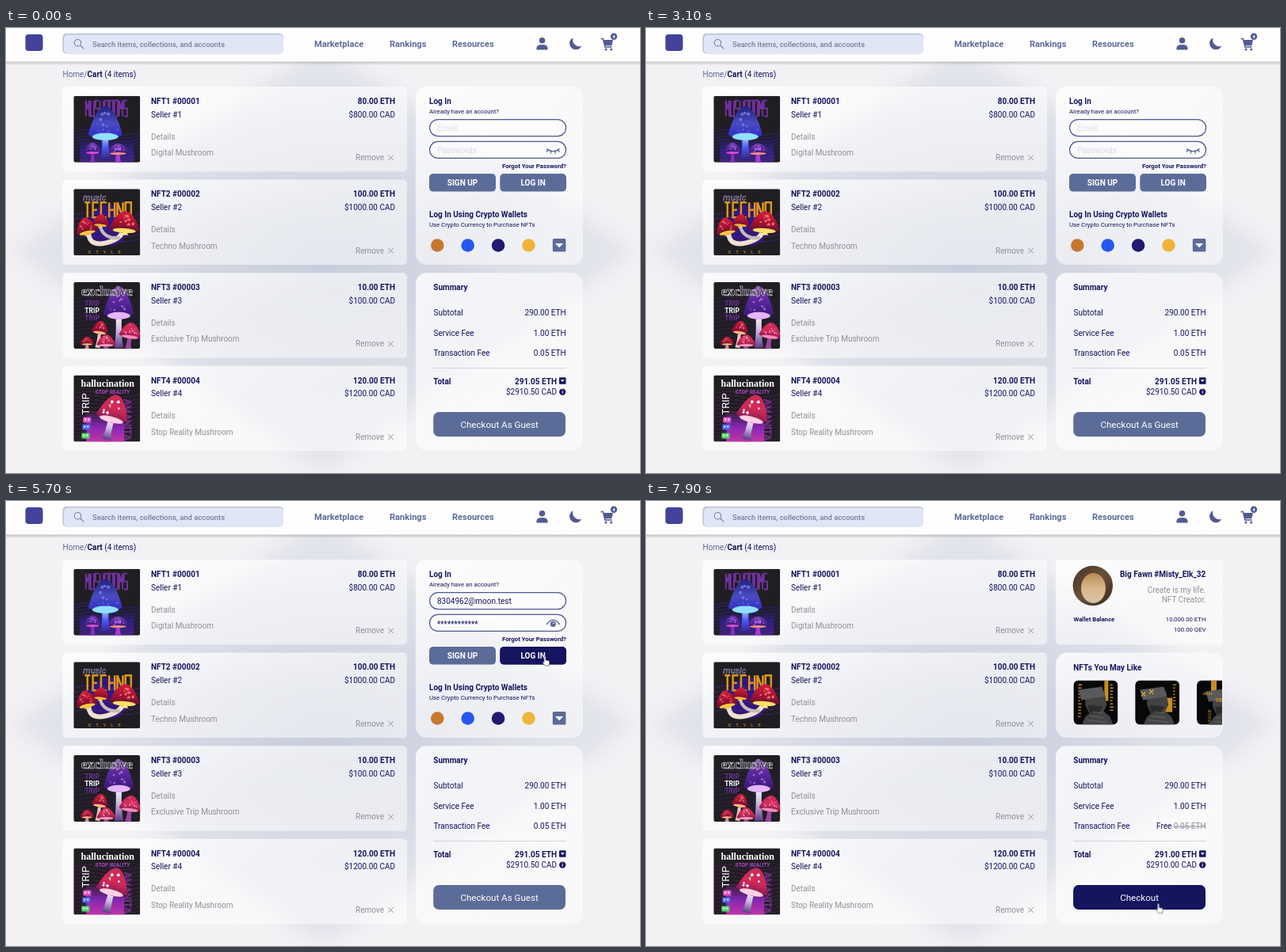
An HTML page for the animation above (8000 ms loop, 800 by 562 pixels).

```html
<!DOCTYPE html>
<html lang="en">
<head>
<meta charset="utf-8">
<title>Cart</title>
<style>
  html, body { margin: 0; width: 100%; height: 100%; overflow: hidden; background: #f2f1f4; }
  svg { display: block; }
  text { font-family: Roboto, sans-serif; white-space: pre; }
  .pointer { animation: move 8s linear infinite; }
  @keyframes move {
    0%, 41.25% { transform: translate(688px, 158px); animation-timing-function: ease-out; }
    45%, 58.75% { transform: translate(600px, 123.5px); animation-timing-function: ease-in-out; }
    61.25%, 65% { transform: translate(600px, 151px); animation-timing-function: ease-in-out; }
    68.75%, 80% { transform: translate(680px, 196px); }
    82.5%, 86.25% { transform: translate(679px, 200px); animation-timing-function: ease-in; }
    88.75% { transform: translate(717px, 344px); animation-timing-function: ease-out; }
    93.75%, 100% { transform: translate(646.5px, 508.5px); }
  }
</style>
</head>
<body>
<script>
const LOOP = 8000, NAVY = '#14145f', SLATE = '#5c6c98', GRAY = '#8f8f98';
let css = '', defs = '', count = 0, seed = 7;

const rand = () => (seed = seed * 16807 % 2147483647) / 2147483647;
const rect = (x, y, w, h, r, fill, more = '') =>
  `<rect x="${x}" y="${y}" width="${w}" height="${h}" rx="${r}" fill="${fill}" ${more}/>`;
const circle = (x, y, r, fill, more = '') => `<circle cx="${x}" cy="${y}" r="${r}" fill="${fill}" ${more}/>`;
const path = (d, fill, more = '') => `<path d="${d}" fill="${fill}" ${more}/>`;
const line = (d, color, w, more = '') => path(d, 'none', `stroke="${color}" stroke-width="${w}" ${more}`);
const group = (x, y, body, more = '') => `<g transform="translate(${x} ${y})" ${more}>${body}</g>`;
const text = (x, y, s, size = 10, color = NAVY, more = '') =>
  `<text x="${x}" y="${y}" font-size="${size}" fill="${color}" ${more}>${s}</text>`;
const BOLD = 'font-weight="700"', END = 'text-anchor="end"', MID = 'text-anchor="middle"';
const SERIF = 'font-weight="700" style="font-family:Liberation Serif,serif"';

function blend(colors, x2 = 0, y2 = 1) {
  const id = 'g' + ++count;
  const stops = colors.map((c, i) => `<stop offset="${i / (colors.length - 1)}" stop-color="${c}"/>`).join('');
  defs += `<linearGradient id="${id}" x2="${x2}" y2="${y2}">${stops}</linearGradient>`;
  return `url(#${id})`;
}

// Visible only between two times of the loop
function show(from, to, body) {
  const id = 'k' + ++count, pc = t => t / LOOP * 100 + '%';
  css += `@keyframes ${id}{0%{opacity:0}${pc(from)}{opacity:1}${pc(to)}{opacity:0}}`;
  return `<g style="opacity:0;animation:${id} 8s step-end infinite">${body}</g>`;
}

// Condensed poster lettering on a 4 by 9 grid
const glyphs = {
  M: 'M0 9V0L2 5 4 0V9', U: 'M0 0V9H4V0', S: 'M4 0H0V4.5H4V9H0', H: 'M0 0V9M4 0V9M0 4.5H4',
  R: 'M0 9V0H4V4.5H0M1.5 4.5 4 9', O: 'M0 0H4V9H0Z', T: 'M0 0H4M2 0V9',
  E: 'M4 0H0V9H4M0 4.5H3', C: 'M4 0H0V9H4', N: 'M0 9V0L4 9V0'
};
const poster = (word, x, y, sx, sy, step, color, w) => [...word].map((c, i) =>
  `<g transform="translate(${x + i * step} ${y}) scale(${sx} ${sy})">` +
  line(glyphs[c], color, w, 'vector-effect="non-scaling-stroke"') + '</g>').join('');

function shroom(x, y, w, h, stem, cap, under, stalk, spot, turn = 0) {
  let dots = '';
  for (let i = 0; i < 12 && spot; i++) {
    const v = .12 + rand() * .68;
    dots += circle((rand() - .5) * w * (1 - v) * .85, -h * v, w * (.018 + rand() * .03), spot);
  }
  return `<g transform="translate(${x} ${y}) rotate(${turn})">` +
    path(`M${-w * .1} 0Q${-w * .07} ${stem * .6} ${-w * .15} ${stem}h${w * .3}Q${w * .07} ${stem * .6} ${w * .1} 0z`, stalk) +
    path(`M${-w / 2} 0C${-w * .4} ${-h * .5} ${-w * .2} ${-h} 0 ${-h}S${w * .4} ${-h * .5} ${w / 2} 0Q0 ${h * .4} ${-w / 2} 0z`, cap) +
    `<ellipse cy="${h * .07}" rx="${w * .38}" ry="${h * .13}" fill="${under}"/>` + dots + '</g>';
}

const blueCap = blend(['#221f7a', '#4a4cc4', '#2723c8']), violetCap = blend(['#7a3fa8', '#55259a', '#33176e']);
const redCap = blend(['#d3203c', '#a8142f', '#5d0d31']), pinkCap = blend(['#c82b55', '#d22b59', '#7d1450']);
const paleStem = blend(['#fff', '#c9b7dc', '#5c3b86']), blueStem = blend(['#c5e4ff', '#4a5cf0', '#31207e']);
const blueHaze = blend(['#2a20a000', '#3325b0', '#5b26a8']), pinkHaze = blend(['#5b1fa000', '#7a24b0', '#c030a8']);
const waves = (n, y, gap, color) => Array.from({ length: n }, (_, i) =>
  line(`M0 ${y + i * gap}q21 -7 42 0t42 0`, color, .7)).join('');

const arts = [
  poster('MUSHROOMS', 15.5, 6, 1.05, 2.2, 6, '#7431a4', 1.8) +
    waves(9, 46, 4, '#3421a0') + rect(8, 52, 68, 32, 0, blueHaze, 'opacity=".6"') +
    shroom(24, 71, 22, 12, 13, violetCap, '#d84bd0', '#8430bd', '#9c6ee0') +
    shroom(56, 72, 28, 12, 12, violetCap, '#ff8b84', '#a63bd0', '#b070e0') +
    shroom(40, 49, 43, 36, 32, blueCap, '#8fe0ff', blueStem, '#6f78dc'),
  circle(44, 46, 26, '#33177c') + waves(6, 33, 6, '#48219a') +
    text(12, 14.5, 'music', 11, 'none', 'stroke="#a89bd5" stroke-width=".5" font-style="italic"') +
    poster('TECHNO', 14, 17, 1.75, 2.1, 10.3, '#dd971d', 2.5) +
    line('M19 57Q21 73 41 68T62 52', '#eee2cf', 6, 'stroke-linecap="round"') +
    line('M34 49Q39 63 57 62', '#c8bcb3', 4, 'stroke-linecap="round"') +
    shroom(17, 54, 27, 18, 5, redCap, '#ffc938', '#f5d98b', '#eb7581', -12) +
    shroom(34, 45, 21, 13, 4, redCap, '#ffb22e', '#f5d98b', '', 6) +
    shroom(64, 51, 38, 23, 7, redCap, '#ffe168', '#ffe9a5', '#ef6c71', 4) +
    text(42, 82, 'STYLE', 6, '#dd971d', MID + ' letter-spacing="6"'),
  waves(12, 22, 5, '#37205a') +
    text(14, 30, 'TRIP', 8.5, '#693195', BOLD) + text(14, 39, 'TRIP', 8.5, '#fff', BOLD) + text(14, 48, 'TRIP', 8.5, '#693195', BOLD) +
    shroom(57, 40, 38, 35, 43, violetCap, '#e7b5ff', paleStem, '#a467c9') +
    shroom(71, 68, 28, 17, 16, pinkCap, '#ff8bb6', '#9d45a5', '#f087a8', 8) +
    shroom(33, 63, 21, 14, 20, redCap, '#f9ba85', '#e8c6bd', '#e46c80', 8) +
    shroom(17, 78, 18, 9, 6, redCap, '#f9ba85', '#d38eaf', '#e46c80') +
    shroom(41, 79, 24, 13, 5, pinkCap, '#ff9bb3', '#a045a0', '#f0a0b4') +
    text(42, 17, 'exclusive', 17, '#242128', MID + ' stroke="#d8d5de" stroke-width=".7" ' + SERIF),
  waves(13, 24, 5, '#532060') + rect(16, 46, 48, 38, 0, pinkHaze) + rect(16, 46, 48, 38, 0, 'url(#grain)') +
    text(43, 14, 'hallucination', 12, '#fff', MID + ' ' + SERIF) +
    text(27, 23.5, 'STOP REALITY', 6.8, '#c44be0', 'font-style="italic" font-weight="500"') +
    text(0, 0, 'TRIP', 13, '#fff', 'transform="translate(19.5 50) rotate(-90)"') +
    text(0, 0, 'AMANITA', 12, 'none', 'stroke="#8a35a5" stroke-width=".7" transform="translate(64 30) rotate(90)"') +
    shroom(48, 54, 40, 30, 28, pinkCap, '#ffd1e6', paleStem, '#fff', 14) +
    [['#e052c8', 12, 53], ['#4b66ec', 11, 62], ['#51d46b', 10, 73]].map(([c, x, y]) =>
      rect(x, y, 10, 7, 1, c) + rect(x + 2, y + 2, 2, 2, 0, '#fff') + rect(x + 6, y + 2, 2, 2, 0, '#fff')).join('')
];

const glass = blend(['#ffffffd0', '#ffffff90', '#ffffff80'], 1, 1);
const card = (x, y, w, h, r) => rect(x, y, w, h, r, glass);

const items = [
  ['Digital Mushroom', '80.00', '800'], ['Techno Mushroom', '100.00', '1000'],
  ['Exclusive Trip Mushroom', '10.00', '100'], ['Stop Reality Mushroom', '120.00', '1200']
].map(([name, eth, cad], i) => group(0, i * 117.6,
  card(71.5, 74, 434.5, 107.5, 5) +
  group(85.3, 85.7, rect(0, 0, 84, 84, 2, '#201e22') + arts[i], 'clip-path="url(#art)"') +
  text(183, 95.8, `NFT${i + 1} #0000${i + 1}`, 10, NAVY, BOLD) +
  text(183, 112.6, `Seller #${i + 1}`) +
  text(183, 140.6, 'Details', 10, GRAY) + text(183, 161.1, name, 10, GRAY) +
  text(491, 95.8, eth + ' ETH', 10, NAVY, BOLD + ' ' + END) +
  text(491, 112.6, `$${cad}.00 CAD`, 10, NAVY, END) +
  text(441, 167.1, 'Remove', 10, GRAY) + line('M482.3 160.5l6.5 6.5m0 -6.5l-6.5 6.5', GRAY, 1))).join('');

const button = (x, y, w, h, r, label, fill, size = 10, more = BOLD) =>
  rect(x, y, w, h, r, fill) + text(x + w / 2, y + h / 2 + size * .36, label, size, '#fff', MID + ' ' + more);
const field = y => rect(534.6, y, 172, 21, 10.5, '#ffffff70', 'stroke="#4d5991" stroke-width="1.2"');

const shutEye = line('M682 152.5q8.3 6.5 16.6 0M684 154l-1.8 2.6M688 155.7l-.8 3M692.6 155.7l.8 3M696.6 154l1.8 2.6', '#48548c', 1.2);
const openEye = line('M682 156q8.3 -11.5 16.6 0', SLATE, 1.5) + circle(690.3, 155.4, 3.6, SLATE) + circle(691, 154.3, 1, '#dfe4f2');

const loginCard = card(517, 74, 211, 225, 14) +
  text(534, 95.8, 'Log In', 10, NAVY, BOLD) + text(534, 108.4, 'Already have an account?', 7.78) +
  field(115.6) + field(143.4) +
  show(0, 4700, text(544.5, 129.8, 'Email', 10, '#d9dbe5')) +
  show(4700, 6900, text(544, 129.8, '8304962@moon.test')) +
  show(0, 5100, text(544.5, 157.8, 'Passwords', 10, '#d9dbe5') + shutEye) +
  show(5100, 6900, text(544, 159.3, '************') + openEye) +
  text(707, 177, 'Forgot Your Password?', 7.78, NAVY, BOLD + ' ' + END) +
  button(534, 184, 84, 22.6, 5, 'SIGN UP', SLATE) +
  button(623.3, 184, 83.7, 22.6, 5, 'LOG IN', SLATE) +
  show(5400, 6900, button(623.3, 184, 83.7, 22.6, 5, 'LOG IN', NAVY)) +
  text(534, 238.7, 'Log In Using Crypto Wallets', 10, NAVY, BOLD) +
  text(534, 251.3, 'Use Crypto Currency to Purchase NFTs', 7.78) +
  ['#c9772f', '#2757ee', '#211a70', '#efb53b'].map((c, i) => circle(544.3 + i * 38.4, 274.5, 8.3, c)).join('') +
  rect(689.8, 266, 16.6, 16.6, 1.5, SLATE) + path('M693 272h10.2l-5.1 5.2z', '#fff');

const gold = '#c98d20';
const bust = (x, y) => group(x, y,
  path('M11 56Q13 46 20 42L15 31 15 15Q26 5 39 14L42 31 38 39 46 46 50 56z', '#434244') +
  path('M18 31l19 2 -5 9 -12 -1z', '#2b2b2d') + path('M6 12L36 8 40 20 10 25z', '#5a595b') +
  line('M17 50l25 3M20 45l18 2M24 40l12 1', '#666', 1));
const tile = (x, body) => group(x, 226.5, rect(0, 0, 56, 56, 6, '#08080a') + body, 'clip-path="url(#tile)"');
const ticks = (x, n) => Array.from({ length: n }, (_, i) => rect(x, 5 + i * 4, 2 + rand() * 3, 1.4, 0, gold)).join('');

const userCard = card(517, 74, 211, 107.5, 5) +
  circle(563.8, 107, 25.2, blend(['#4a3526', '#69503a', '#35291f'], 1, 1)) +
  `<ellipse cx="564.5" cy="110" rx="15.5" ry="19" fill="${blend(['#b98a55', '#d9b78c', '#d8c3a5'])}"/>` +
  text(706.3, 95.8, 'Big Fawn #Misty_Elk_32', 10, NAVY, BOLD + ' ' + END) +
  text(706.5, 115.6, 'Create is my life.', 10, GRAY, END) + text(706.5, 127.5, 'NFT Creator.', 10, GRAY, END) +
  text(539.5, 152, 'Wallet Balance', 7.78, NAVY, BOLD) +
  text(706.5, 151.8, '10,000.00 ETH', 7.78, NAVY, END) + text(706.5, 165, '100.00 QEV', 7.78, NAVY, END) +
  card(517, 191.6, 211, 107.5, 14) + text(539.3, 213.5, 'NFTs You May Like', 10, NAVY, BOLD) +
  '<g clip-path="url(#strip)">' +
  tile(539.4, rect(39, 0, 5, 26, 0, gold) + ticks(46, 9) + ticks(6, 11) + bust(0, 0)) +
  tile(617.2, rect(36, 22, 11, 18, 0, gold) + ticks(48, 8) + bust(0, 0) + line('M8 15l5 5m0 -5l-5 5M18 12l5 5m0 -5l-5 5', '#f0b534', 1.2)) +
  tile(695, rect(18, 0, 7, 14, 0, gold) + bust(5, 2) + text(8, 18, 'NIGHT', 4, gold, BOLD) +
    text(23, 27, '98', 8, gold, BOLD) + text(0, 0, 'LEAGUE', 5, gold, 'transform="translate(18 55) rotate(-90)"')) + '</g>';

const row = (y, label, value) => text(539.5, y, label) + text(706.7, y, value, 10, NAVY, END);
const totals = (eth, cad) => text(695, 449.7, eth + ' ETH', 10, NAVY, BOLD + ' ' + END) + text(695, 463.3, `$${cad} CAD`, 10, NAVY, END);
const checkout = (label, fill) => button(539.2, 485, 166.8, 31, 7, label, fill, 11.6, '');

const summary = card(517, 309.2, 211, 224.5, 14) +
  text(539.3, 331.2, 'Summary', 10, NAVY, BOLD) +
  row(362.9, 'Subtotal', '290.00 ETH') + row(388.6, 'Service Fee', '1.00 ETH') +
  line('M539 429.5H707', '#d3d4de', 1) + text(539.3, 449.7, 'Total', 10, NAVY, BOLD) +
  rect(698, 441.2, 8.5, 8.5, 1, NAVY) + path('M699.7 444.3h5.1l-2.55 2.6z', '#fff') +
  circle(702.2, 459.6, 4.2, NAVY) + text(702.2, 462, 'i', 6.5, '#fff', MID + ' ' + BOLD) +
  show(0, 6900, row(414.2, 'Transaction Fee', '0.05 ETH') + totals('291.05', '2910.50') + checkout('Checkout As Guest', SLATE)) +
  show(6900, 8000, row(414.2, 'Transaction Fee', `Free <tspan fill="${GRAY}" text-decoration="line-through">0.05 ETH</tspan>`) +
    totals('291.00', '2910.00') + checkout('Checkout', SLATE)) +
  show(7500, 8000, checkout('Checkout', NAVY));

const ICON = '#4f5c92';
const header = rect(0, 42, 800, 5, 0, blend(['#00000038', '#00000000'])) + rect(0, 0, 800, 42.5, 0, '#fefefe') +
  rect(24.5, 8, 22, 21, 4, '#43439a') +
  rect(71.5, 7, 278.5, 25.5, 5, '#b9bfd6') + rect(73, 8.6, 277, 23.9, 5, '#e1e6f7') +
  circle(90.5, 18.7, 4.2, 'none', 'stroke="#7b82a2" stroke-width="1.1"') + line('M93.6 21.8l4.8 4.6', '#7b82a2', 1.3) +
  text(109, 23.5, 'Search items, collections, and accounts', 9.44, '#777d98', 'font-weight="500"') +
  [[389, 'Marketplace'], [484, 'Rankings'], [563, 'Resources']].map(([x, s]) => text(x, 24, s, 11.11, SLATE, BOLD)).join('') +
  circle(676.5, 15.7, 3.8, ICON) + path('M669.5 27.5v-2.2q0 -4.300 7 -4.3t7 4.3v2.2z', ICON) +
  path('M715.5 12.2A8 8 0 1 0 726.3 22.8A8.5 8.5 0 0 1 715.5 12.2z', ICON) +
  line('M750.5 13.5h2.8l2.6 10.4h8.6', ICON, 1.5) + path('M753.8 15h12.2l-1.7 7.3h-8.7z', ICON) +
  circle(757, 27, 1.5, ICON) + circle(763.7, 27, 1.5, ICON) +
  circle(767, 10.8, 4.2, ICON) + text(767, 13, '4', 6, '#fff', MID + ' ' + BOLD) +
  text(71.5, 61.8, `<tspan fill="${SLATE}">Home/</tspan><tspan ${BOLD}>Cart</tspan> (4 items)`);

const hand = path('M-1 1c0 -1.4 2 -1.4 2 0v4l3.3 .7c1 .2 1.5 .9 1.4 1.9l-.6 4.4H.4L-2.7 8.6c-.6 -.9 .5 -1.7 1.2 -1l.5 .4z', '#fff', 'stroke="#55555c" stroke-width=".7"');
const arrow = path('M0 0V9.2L2.2 7.2 3.8 10.6 5.2 10 3.7 6.7H6.7z', '#fff', 'stroke="#77777e" stroke-width=".7"');
const pointer = '<g class="pointer">' + show(3300, 3500, arrow) + show(3500, 6600, hand) +
  show(6600, 7400, arrow) + show(7400, 8000, hand) + '</g>';

defs += `<radialGradient id="core"><stop stop-color="#c8cddc"/><stop offset=".35" stop-color="#d2d6e2"/>
    <stop offset=".7" stop-color="#e0e2ea"/><stop offset="1" stop-color="#e4e5ec"/></radialGradient>
  <filter id="soft"><feGaussianBlur stdDeviation="12"/></filter>
  <pattern id="grain" width="3" height="3" patternUnits="userSpaceOnUse"><circle cx="1.5" cy="1.5" r=".7" fill="#e04ab0" opacity=".6"/></pattern>
  <clipPath id="art"><rect width="84" height="84" rx="2"/></clipPath>
  <clipPath id="tile"><rect width="56" height="56" rx="6"/></clipPath>
  <clipPath id="strip"><rect x="517" y="191" width="210" height="108"/></clipPath>`;

const body = rect(0, 0, 800, 562, 0, '#f2f1f4') +
  path('M400 22L794 282 400 562 6 282z', 'url(#core)', 'filter="url(#soft)"') +
  header + items + show(0, 6900, loginCard) + show(6900, 8000, userCard) + summary + pointer;

document.body.innerHTML = `<style>${css}</style><svg width="800" height="562" viewBox="0 0 800 562"><defs>${defs}</defs>${body}</svg>`;
</script>
</body>
</html>
```
